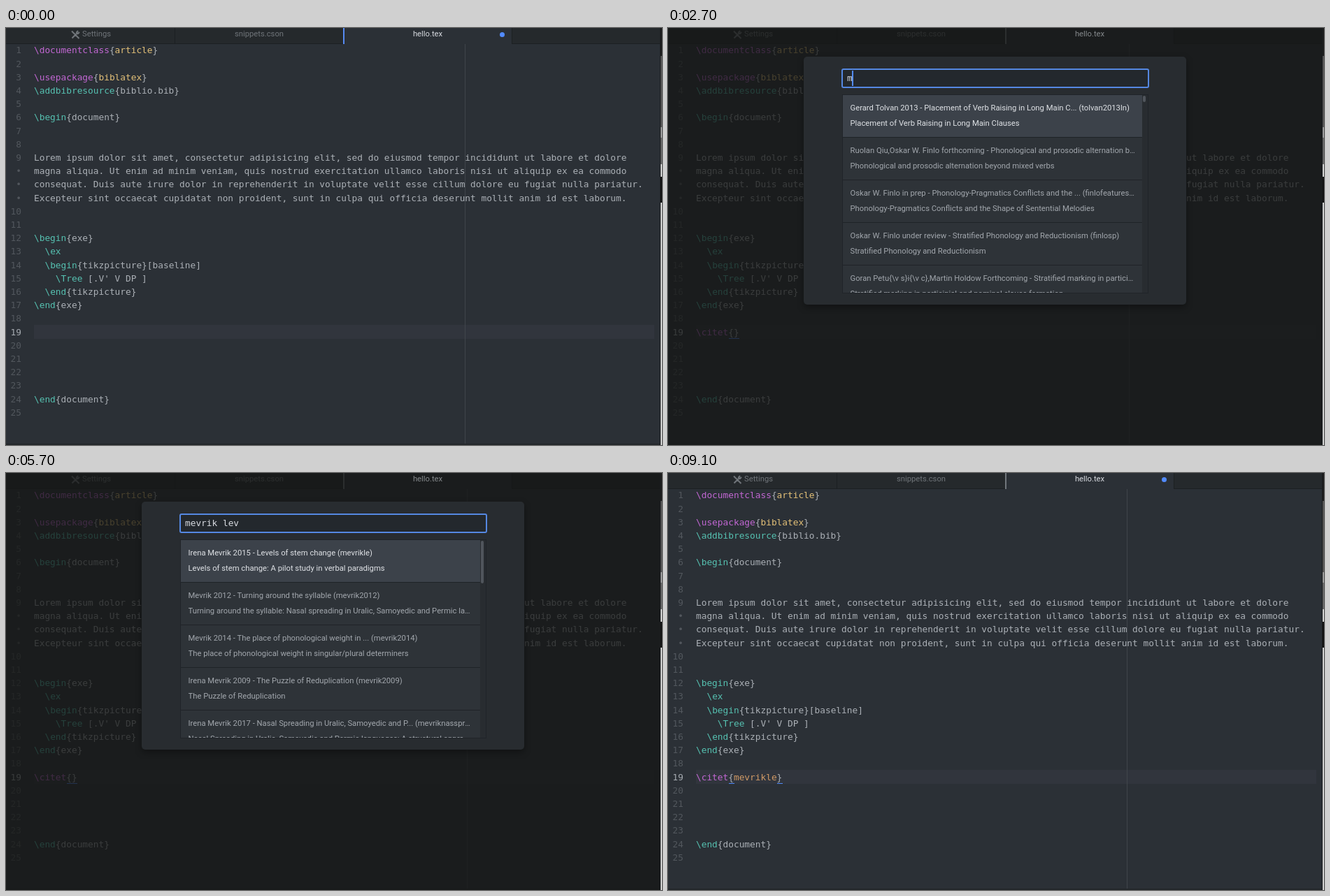
These frames come from a looping animation (938 px wide and 597 px high, 9200 ms). An HTML page:

```html
<!DOCTYPE html>
<html lang="en">
<head>
<meta charset="utf-8">
<title>Citation picker</title>
<style>
html, body { margin: 0; width: 100%; height: 100%; overflow: hidden; background: #2b3036; }
body { position: relative; font: 11.25px/18px Roboto, sans-serif; color: #abb0b6; }
div { position: absolute; box-sizing: border-box; white-space: pre; }
.mono, .row, .num { font: 12.8px/19.2px "DejaVu Sans Mono", monospace; }
.row { left: 40px; }
.num { left: 0; width: 22px; text-align: right; color: #52575d; }
.cmd { color: #56c1b1; }
.key { color: #c267d3; }
.arg { color: #e3c078; }
.cite { color: #d19a66; }
.caret { width: 2px; background: #528bff; }
.under { top: 444px; width: 8px; height: 1px; background: #528bff; }

#bar { left: 0; top: 0; width: 935px; height: 23px; background: #25292c; border-bottom: 1px solid #1c2022; }
.tab { top: 0; width: 241px; height: 22px; text-align: center; color: #70757a; border-right: 1px solid #1c2022; }
#active { left: 482px; top: 0; width: 242px; height: 23px; background: #2b3036; border-right: 1px solid #1c2022; }
#accent { left: 482px; top: 0; width: 2px; height: 23px; }
#dot { left: 706px; top: 6px; width: 7px; height: 7px; border-radius: 50%; background: #528bff; }
#title { left: 483px; top: 0; width: 240px; text-align: center; }
#current { left: 40px; top: 425px; width: 887px; height: 20px; background: #31353d; }
#guide { top: 23px; width: 1px; height: 572px; background: #40454b; }
#caret { top: 426px; height: 19px; }
#foot { left: 0; top: 595px; width: 935px; height: 2px; background: #23272a; }
#edge { left: 935px; top: 0; width: 3px; height: 597px; border-left: 1px solid #1b1d1f;
  background: linear-gradient(#1c1c1c 40px, #555 40px 142px, #999 142px 157px, #666 157px 195px,
    #ccc 195px 213px, #111 213px 250px, #ccc 250px); }

#popup { left: 11px; top: 446px; width: 223px; background: #282c33; border: 1px solid #1c2022; }
.hint { left: 0; width: 221px; height: 26px; line-height: 26px !important; padding-left: 28px; }
.hint i { position: absolute; left: 0; width: 22px; text-align: center; font-style: normal; color: #98c379; background: #30382f; }
.hint.on { background: #3a3f4b; color: #d7dae0; }

#dim { left: 0; top: 0; width: 935px; height: 597px; background: rgb(20, 22, 21); }
#modal { left: 194px; top: 41px; width: 547px; height: 355px; background: #282c30; border-radius: 5px;
  box-shadow: 0 4px 10px rgba(0, 0, 0, .35); }
#input { left: 54px; top: 17px; width: 440px; height: 28px; border: 2px solid #5588e2; border-radius: 3px; background: #23282d; }
#query { left: 6px; top: 2px; color: #d7dae0; }
#blink { top: 1px; height: 22px; }
#list { left: 55px; top: 54px; width: 438px; height: 285px; overflow: hidden; border: 1px solid #202429; }
.item { left: 0; width: 428px; height: 61.2px; padding: 8px 10px 0 10.5px; background: #2e3338; border-bottom: 1px solid #1f2327;
  line-height: 22px; color: #a2a7ad; }
.item.on { background: #3c424a; color: #dfe2e6; }
.item p { margin: 0; overflow: hidden; text-overflow: ellipsis; white-space: nowrap; }
#thumb { left: 485px; top: 56px; width: 4px; border-radius: 2px; background: #50555c; }
</style>
</head>
<body>
<div id="bar">
  <div class="tab" style="left:1px"></div>
  <div class="tab" style="left:242px">snippets.cson</div>
  <div style="left:109px;top:0;color:#70757a">Settings</div>
  <svg style="position:absolute;left:93px;top:3px" width="13" height="13" fill="none" stroke="#70757a" stroke-width="2">
    <path d="M1 1.5 4 4.5M4 4.5 11.5 12M1.5 11.5 8.5 4.5M12 3 9.8 5 8 3.2 10 1"/>
  </svg>
</div>
<div id="active"></div><div id="accent"></div><div id="dot"></div>
<div id="current"></div>
<div id="text"></div>
<div id="cite" class="row" style="top:425.6px"></div>
<div id="guide"></div>
<div id="open" class="under"></div><div id="close" class="under"></div>
<div id="caret" class="caret"></div>
<div id="foot"></div>
<div id="popup"></div>
<div id="dim"></div>
<div id="title">hello.tex</div>
<div id="modal">
  <div id="input"><div id="query" class="mono"></div><div id="blink" class="caret"></div></div>
  <div id="list"></div>
  <div id="thumb"></div>
</div>
<div id="edge"></div>
<script>
const $ = id => document.getElementById(id);
const LOOP = 9200, CHAR = 7.706, ROW = 19.2;

const source = String.raw`\documentclass{article}

\usepackage{biblatex}
\addbibresource{biblio.bib}

\begin{document}


Lorem ipsum dolor sit amet, consectetur adipisicing elit, sed do eiusmod tempor incididunt ut labore et dolore
magna aliqua. Ut enim ad minim veniam, quis nostrud exercitation ullamco laboris nisi ut aliquip ex ea commodo
consequat. Duis aute irure dolor in reprehenderit in voluptate velit esse cillum dolore eu fugiat nulla pariatur.
Excepteur sint occaecat cupidatat non proident, sunt in culpa qui officia deserunt mollit anim id est laborum.


\begin{exe}
  \ex
  \begin{tikzpicture}[baseline]
    \Tree [.V' V DP ]
  \end{tikzpicture}
\end{exe}






\end{document}
`.split("\n");

const paint = line => line
  .replace(/\\(documentclass|usepackage)\{(\w+)\}/, '<b>\\$1</b>{<u>$2</u>}')
  .replace(/\\(cite\w*)(?:\{(\w*)\})?/, (m, c, k) =>
    `<b>\\${c}</b>` + (k === undefined ? "" : `{<span class="cite">${k}</span>}`))
  .replace(/(^|\s)(\\\w*)/, '$1<span class="cmd">$2</span>')
  .replace(/<b>(.*?)<\/b>/, '<span class="key">$1</span>')
  .replace(/<u>(.*?)<\/u>/, '<span class="arg">$1</span>');

// Rows 9 to 11 continue a wrapped line and carry a bullet.
$("text").innerHTML = source.map((line, i) => {
  const top = `style="top:${22.4 + i * ROW}px${i == 21 ? ";color:#a5aab0" : ""}"`;
  const num = i < 9 ? i + 1 : i < 12 ? "•" : i - 2;
  return `<div class="num" ${top}>${num}</div><div class="row" ${top}>${paint(line)}</div>`;
}).join("");

const levels = ["Irena Mevrik 2015 - Levels of stem change (mevrikle)",
  "Levels of stem change: A pilot study in verbal paradigms"];
const nasal = ["Irena Mevrik 2017 - Nasal Spreading in Uralic, Samoyedic and P... (mevriknasspread)",
  "Nasal Spreading in Uralic, Samoyedic and Permic languages: A structural approach to features"];
const turning = ["Mevrik 2012 - Turning around the syllable (mevrik2012)",
  "Turning around the syllable: Nasal spreading in Uralic, Samoyedic and Permic languages"];
const types = ["Willem ter Brandel,Irena Mevrik 2013 - Types of partial nasal spreading in Uralic languages",
  "Types of partial nasal spreading in Uralic languages"];
const regions = ["Irena Mevrik 2015 - Regions at the margin (mevrikdiss)",
  "Regions at the margin: Between Syntax and Prosody"];
const all = [
  ["Gerard Tolvan 2013 - Placement of Verb Raising in Long Main C... (tolvan2013ln)",
    "Placement of Verb Raising in Long Main Clauses"],
  ["Ruolan Qiu,Oskar W. Finlo forthcoming - Phonological and prosodic alternation beyond mixed verbs",
    "Phonological and prosodic alternation beyond mixed verbs"],
  ["Oskar W. Finlo in prep - Phonology-Pragmatics Conflicts and the ... (finlofeatures2)",
    "Phonology-Pragmatics Conflicts and the Shape of Sentential Melodies"],
  ["Oskar W. Finlo under review - Stratified Phonology and Reductionism (finlosp)",
    "Stratified Phonology and Reductionism"],
  [String.raw`Goran Petu{\v s}i{\v c},Martin Holdow Forthcoming - Stratified marking in participial clauses`,
    "Stratified marking in participial and nominal clause formation"]];
const some = [all[0], levels, types, all[1], regions];
const byName = [levels, nasal, types, turning, regions];
const byTitle = [levels, turning,
  ["Mevrik 2014 - The place of phonological weight in ... (mevrik2014)",
    "The place of phonological weight in singular/plural determiners"],
  ["Irena Mevrik 2009 - The Puzzle of Reduplication (mevrik2009)", "The Puzzle of Reduplication"],
  nasal];

// Timelines: [start in ms, value]
const typed = [[0, ""], [600, "\\"], [900, "\\c"], [1100, "\\ci"], [1400, "\\cit"], [1500, "\\cite"],
  [1700, "\\citet"], [2000, "\\citet{}"], [7600, "\\citet{mevrikle}"]];
const queries = [[0, ""], [2700, "m"], [3100, "me"], [3400, "mev"], [3600, "mevr"], [3700, "mevri"],
  [3900, "mevrik"], [4400, "mevrik "], [4700, "mevrik l"], [5100, "mevrik le"], [5300, "mevrik lev"]];
const results = [[0, []], [2300, all], [3100, some], [3400, byName], [5400, byTitle]];
const thumbs = [[0, 0], [2300, 9], [3100, 12], [3400, 22], [5400, 61]];
const hints = [[0, []], [1100, ["cite"]], [1400, ["cite", "citet", "citep", "citealt"]], [1700, ["citet"]], [2000, []]];

const at = (line, t) => line.filter(step => step[0] <= t).pop()[1];
const within = (t, ...spans) => spans.some(([a, b]) => t >= a && t < b);
const show = (id, on) => $(id).style.display = on ? "block" : "none";

function draw(t) {
  const modal = within(t, [2200, 7600]);
  const line = at(typed, t), inside = within(t, [2000, 7600]);
  $("cite").innerHTML = paint(line);
  $("caret").style.left = 40 + CHAR * (inside ? 7 : line.length) + "px";
  show("caret", within(t, [300, 2200], [7600, 8000], [8300, 8800]));
  show("open", t >= 2000);
  show("close", t >= 2000);
  $("open").style.left = 40.5 + CHAR * 6 + "px";
  $("close").style.left = 40 + CHAR * (line.length - 1) + "px";
  $("guide").style.left = (modal ? 659 : 656) + "px";
  $("accent").style.background = modal || t >= 9100 ? "#70767c" : "#568af2";
  $("title").style.color = modal ? "#85898c" : "#d7dae0";
  show("dot", !within(t, [2200, 7900]));

  const words = at(hints, t);
  show("popup", words.length);
  $("popup").style.height = words.length * 26 + 2 + "px";
  $("popup").innerHTML = words.map((w, i) =>
    `<div class="hint mono ${i ? "" : "on"}" style="top:${i * 26}px"><i>s</i>${w}</div>`).join("");

  show("dim", modal);
  show("modal", modal);
  if (!modal) return;
  const fade = Math.min(1, (t - 2100) / 300);
  $("dim").style.opacity = .75 * (1 - (1 - fade) ** 3);
  const query = at(queries, t);
  $("query").textContent = query;
  $("blink").style.left = 5 + CHAR * query.length + "px";
  show("blink", !within(t, [4200, 4400], [5700, 6100], [6700, 7000], [7300, 7600]));
  $("list").innerHTML = at(results, t).map(([a, b], i) =>
    `<div class="item ${i ? "" : "on"}" style="top:${i * 61.2 - .5}px"><p>${a}</p><p>${b}</p></div>`).join("");
  $("thumb").style.height = at(thumbs, t) + "px";
}

const start = performance.now();
let last = -1;
function tick(now) {
  const t = Math.floor(Math.max(0, now - start) % LOOP / 100) * 100;
  if (t !== last) draw(last = t);
  requestAnimationFrame(tick);
}
draw(0);
requestAnimationFrame(tick);
</script>
</body>
</html>
```
